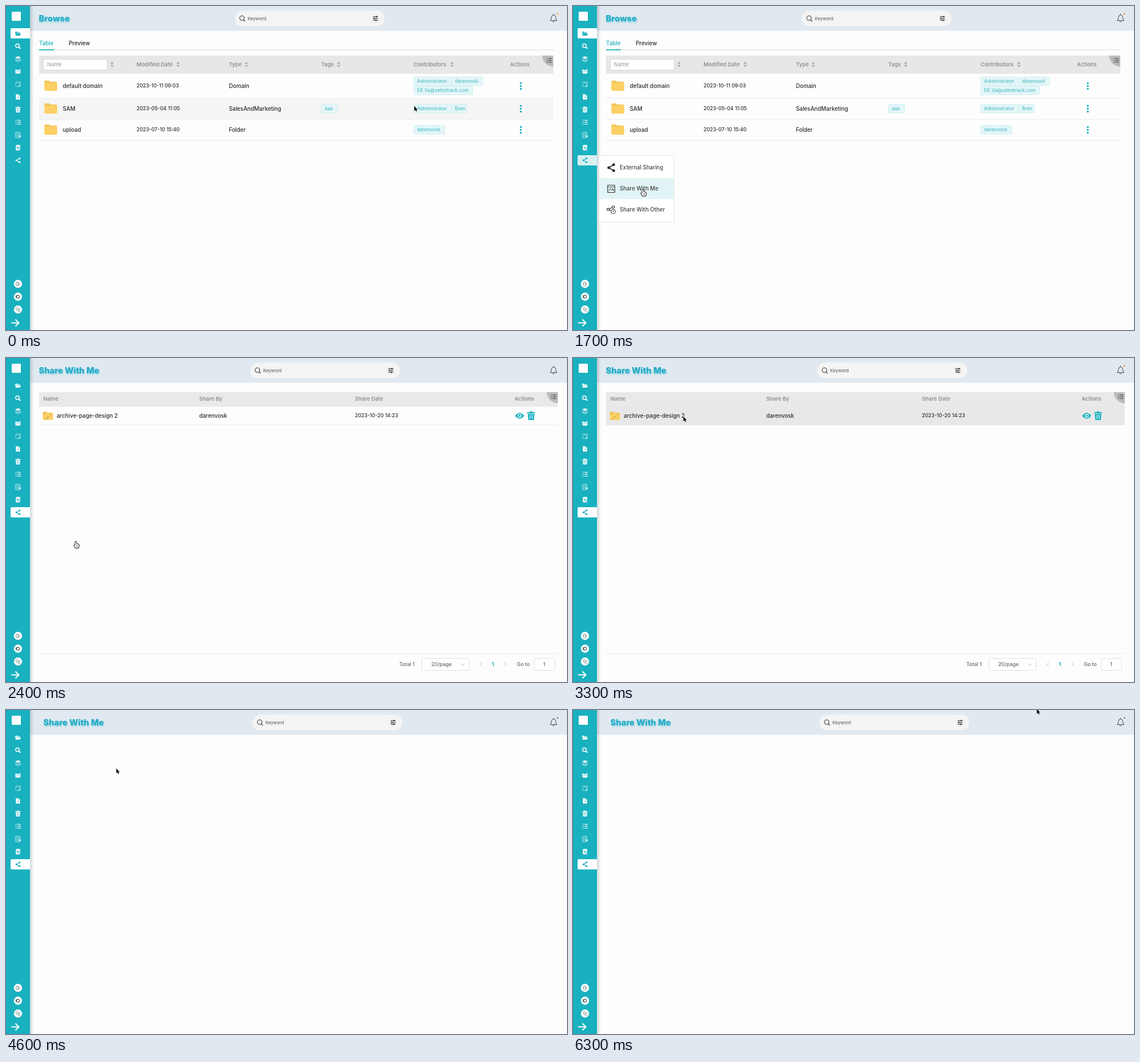
An HTML page with a canvas for the animation above (6.4 s loop, 984 by 569 pixels).

```html
<!DOCTYPE html>
<html lang="en">
<head>
<meta charset="utf-8">
<title>Shared documents</title>
<style>
html, body { margin: 0; width: 984px; height: 569px; overflow: hidden; background: #fdfdfd; }
canvas { display: block; }
</style>
</head>
<body>
<canvas id="stage" width="984" height="569"></canvas>
<script>
const ctx = document.getElementById('stage').getContext('2d');
const LOOP = 6400, STEP = 100;
const TEAL = '#19b1bf', INK = '#2b2b2b', GREY = '#8e8e90', LINE = '#e9e9ed';
const OPEN_MENU = 800, SHARED_PAGE = 2300, EMPTY_PAGE = 4400;
const USER = 'darenvosk';

// Pointer stops: time, x, y
const STOPS = [
  [0, 716, 175.5], [100, 716, 175.5], [800, 13.5, 271.5], [1000, 13.5, 271.5],
  [1500, 122.5, 322.5], [2600, 122.5, 322.5], [3200, 193.5, 102.5],
  [5500, 193.5, 102.5], [6300, 813.5, -2]
];

function pointerAt(t) {
  const i = STOPS.findIndex(s => s[0] > t);
  if (i < 0) return STOPS[STOPS.length - 1].slice(1);
  const [t0, x0, y0] = STOPS[i - 1], [t1, x1, y1] = STOPS[i];
  const k = (t - t0) / (t1 - t0), e = k * k * (3 - 2 * k);
  return [x0 + (x1 - x0) * e, y0 + (y1 - y0) * e];
}

function rect(x, y, w, h, fill, r = 0, border) {
  ctx.beginPath();
  ctx.roundRect(x, y, w, h, r);
  if (fill) { ctx.fillStyle = fill; ctx.fill(); }
  if (border) { ctx.strokeStyle = border; ctx.lineWidth = 1; ctx.stroke(); }
}

function text(s, x, y, size = 9.8, color = INK, weight = 500) {
  ctx.font = `${weight} ${size}px Inter, sans-serif`;
  ctx.fillStyle = color;
  ctx.fillText(s, x, y + size * 0.36);
}
const date = (s, x, y) => text(s, x, y, 8.8);
const heading = (s, x, y) => text(s, x, y, 9.4, GREY, 600);

function circle(x, y, r, fill, stroke, width = 1) {
  ctx.beginPath();
  ctx.arc(x, y, r, 0, 7);
  if (fill) { ctx.fillStyle = fill; ctx.fill(); }
  if (stroke) { ctx.strokeStyle = stroke; ctx.lineWidth = width; ctx.stroke(); }
}

function poly(points, color, width) {
  ctx.beginPath();
  points.forEach(([x, y]) => ctx.lineTo(x, y));
  if (width) { ctx.strokeStyle = color; ctx.lineWidth = width; ctx.stroke(); }
  else { ctx.fillStyle = color; ctx.closePath(); ctx.fill(); }
}

function path(d, color, width) {
  const p = new Path2D(d);
  if (width) { ctx.strokeStyle = color; ctx.lineWidth = width; ctx.stroke(p); }
  else { ctx.fillStyle = color; ctx.fill(p); }
}

function at(x, y, draw, scale = 1) {
  ctx.save();
  ctx.translate(x, y);
  ctx.scale(scale, scale);
  draw();
  ctx.restore();
}

const icon = {
  folder(c) {
    path('M-5 3V-3.5H-1.5L-.5-2.5H3.5V-1H-3Z', c);
    path('M-3-.4H5.6L3.6 4H-5Z', c);
  },
  search(c) {
    circle(-1, -1, 3.4, null, c, 1.6);
    poly([[1.5, 1.5], [4.8, 4.8]], c, 2);
  },
  layers(c) {
    path('M0-5L5.5-2.4L0 .2L-5.5-2.4Z', c);
    path('M-5.5 0L0 2.6L5.5 0V1L0 3.4L-5.5 1Z', c);
    path('M-5.5 2.5L0 5L5.5 2.5V3.3L0 5.7L-5.5 3.3Z', c);
  },
  addFolder(c) {
    icon.folder(c);
    poly([[3.5, -5], [3.5, -1]], c, 1);
    poly([[1.5, -3], [5.5, -3]], c, 1);
  },
  box(c) {
    ctx.globalAlpha = 0.6;
    rect(-4.5, -2.5, 8, 7, null, 1, c);
    poly([[-3.5, -4.5], [4.5, -4.5], [4.5, 0]], c, 1);
    circle(3, 3, 1.8, c);
  },
  file(c) {
    path('M-4-5H1.5L4-2.5V5H-4Z', c);
    path('M1.5-5V-2.5H4M-1 1H2M.5-.5V2.5', TEAL, 0.8);
  },
  trash(c, gap = TEAL) {
    rect(-5, -4.6, 10, 1.5, c);
    rect(-1.7, -5.6, 3.4, 1.5, c);
    path('M-4.2-2.4H4.2L3.5 5.5H-3.5Z', c);
    [-1.7, 0, 1.7].forEach(x => rect(x - 0.3, -1, 0.6, 5, gap));
  },
  list(c) {
    [-3.6, 0, 3.6].forEach(y => {
      poly([[-5, y], [-4.1, y + 0.9], [-2.6, y - 1.1]], c, 1);
      rect(-1.2, y - 0.6, 6.5, 1.3, c);
    });
  },
  form(c) {
    ctx.globalAlpha = 0.8;
    rect(-4.5, -5, 8, 10, null, 0.5, c);
    [-2.5, 0, 2.5].forEach(y => rect(-3, y - 0.4, 5, 0.8, c));
    circle(3.5, 2.5, 2, c);
  },
  copy(c) {
    rect(-4, -5, 8, 10, c, 1);
    circle(0.5, 0.5, 2.2, null, TEAL, 0.9);
    poly([[-3, -3], [3, 4]], TEAL, 0.8);
  },
  share(c) {
    poly([[3, -3.6], [-3, 0], [3, 3.6]], c, 1.3);
    [[3, -3.6], [-3, 0], [3, 3.6]].forEach(([x, y]) => circle(x, y, 1.7, c));
  },
  image(c) {
    rect(-6, -5.5, 12, 12, null, 0.5, c);
    poly([[-6, -2.7], [6, -2.7]], c, 0.8);
    poly([[-4.5, 4.5], [-1.5, -0.5], [1, 3], [3, 0], [4.8, 4.5]], c, 0.9);
  },
  shareClock(c) {
    poly([[3, -4], [-4, 0], [1, 3]], c, 1);
    circle(3.5, -4, 2, '#fff', c);
    circle(-5, 0, 2, '#fff', c);
    circle(3.5, 3.5, 3.5, '#fff', c);
    poly([[3.5, 1.5], [3.5, 3.7], [5, 4]], c, 0.8);
  },
  eye(c) {
    path('M-8 0Q0-10 8 0Q0 10-8 0Z', c);
    circle(0, 0, 3.3, '#fff');
    circle(0, 0, 2, c);
  }
};
const SIDE = ['folder', 'search', 'layers', 'addFolder', 'box', 'file', 'trash', 'list', 'form', 'copy', 'share'];

function sidebar(active, hovered) {
  const shade = ctx.createLinearGradient(42, 0, 49, 0);
  shade.addColorStop(0, 'rgba(60,90,100,.24)');
  shade.addColorStop(1, 'rgba(60,90,100,0)');
  rect(42, 0, 7, 569, shade);
  rect(0, 0, 42, 569, TEAL);
  rect(10, 10, 16, 16, '#fff');
  SIDE.forEach((name, i) => {
    const y = 48.3 + i * 22.27, on = i === active, over = i === hovered;
    if (on || over) rect(8, Math.round(y) - 9, 34, 18, on ? '#fff' : '#d7eff2', [2, 0, 0, 2]);
    at(21, y, () => icon[name](on || over ? TEAL : '#fff'), 0.93);
  });
  [488, 510.5, 533].forEach(y => circle(21, y, 7.2, '#f8fcfc'));
  rect(18, 485, 4.5, 6, null, 1, '#7c8586');
  poly([[20.5, 488], [24.5, 488]], '#7c8586', 1);
  circle(21, 510.5, 2.6, null, '#596b6d', 1.4);
  poly([[17.5, 508], [17.5, 513]], '#596b6d', 1);
  circle(19.6, 531.7, 2.2, null, '#899');
  circle(22.8, 534.5, 2.2, null, '#899');
  poly([[9, 556.5], [22, 556.5]], '#fff', 2);
  poly([[16.5, 550.5], [22.5, 556.5], [16.5, 562.5]], '#fff', 2);
}

function topBar(title, titleX, shift, dot) {
  rect(41, 0, 943, 43.5, '#e1e9f0');
  ctx.save();
  ctx.shadowColor = 'rgba(25,177,205,.5)';
  ctx.shadowBlur = 3;
  ctx.shadowOffsetX = 1;
  ctx.shadowOffsetY = 2;
  text(title, titleX, 21.5, 14.7, '#22abc6', 800);
  ctx.restore();
  at(shift, 0, () => {
    rect(401.5, 8, 262.5, 28, '#f4f4f4', 14);
    circle(414, 21.3, 4, null, '#333', 1.1);
    poly([[416.8, 24.2], [419.5, 27]], '#333', 1.2);
    text('Keyword', 424, 21.8, 7.9, '#555', 400);
    [[18.6, 2], [21.8, -2], [25, 1]].forEach(([y, k]) => {
      rect(643.5, y - 0.5, 9, 1.1, '#333');
      rect(647 + k, y - 1.4, 1.6, 2.8, '#333');
    });
  });
  path('M954.5 25.5Q956.7 23.5 956.7 20Q957 16 960.5 15.7Q964 16 964.3 20Q964.3 23.5 966.5 25.5Z', '#3c4650', 1);
  path('M958.7 26.5Q960.5 30 962.3 26.5M960.5 14V16', '#3c4650', 1);
  if (dot) circle(967.3, 14, 1.6, dot);
}

function corner(x, y, iconX, iconY) {
  ctx.beginPath();
  ctx.moveTo(x, y);
  ctx.lineTo(x, y + 19);
  ctx.arc(x, y, 19.5, Math.PI / 2, Math.PI);
  ctx.fillStyle = '#bcbcbc';
  ctx.fill();
  at(iconX, iconY, () => icon.list('#444'), 0.9);
}

function sorter(x) {
  poly([[x - 3, 101.5], [x, 98], [x + 3, 101.5]], '#a5a5a8');
  poly([[x - 3, 103.7], [x, 107.2], [x + 3, 103.7]], '#a5a5a8');
}

function yellowFolder(x, y, scale = 1) {
  at(x, y, () => {
    path('M-11-7.5Q-11-9-9.5-9H-3L-1-7H9Q11-7 11-5V7H-11Z', '#f3c65a');
    rect(-11, -5, 22, 14, '#fcd064', 1.5);
  }, scale);
}

function tag(s, x, y, w) {
  rect(x + 0.5, y - 7.5, w - 1, 15, '#e4f6f8', 2, '#cdeef1');
  text(s, x + 6, y, 8.3, '#3bb4c2', 400);
}

function browsePage(px, py) {
  text('Table', 58, 65, 9.8, TEAL);
  text('Preview', 110, 65);
  rect(58, 76.5, 902, 1, '#dcdce0');
  rect(58, 76, 26, 1.7, TEAL);
  rect(58, 87, 902, 32, '#e7e7e8');
  rect(65.5, 93.5, 112, 19, '#fff', 2, '#d8d8dc');
  text('Name', 72, 103, 9.3, '#999', 400);
  sorter(186);
  [['Modified Date', 229, 302], ['Type', 391, 421.5], ['Tags', 553, 583.5], ['Contributors', 715, 782]]
    .forEach(([s, x, sx]) => { heading(s, x, 102.5); sorter(sx); });
  heading('Actions', 884, 102.5);
  corner(960, 87, 952.5, 95.5);

  const rows = [
    [119, 162, 140, 'default domain', '2023-10-11 09:03', 'Domain'],
    [162, 199, 180, 'SAM', '2023-05-04 11:05', 'SalesAndMarketing'],
    [199, 236, 217, 'upload', '2023-07-10 15:40', 'Folder']
  ];
  rows.forEach(([top, end, y, name, modified, type]) => {
    if (px > 58 && px < 960 && py >= top && py < end) rect(58, top, 902, end - top, '#f5f5f5');
    rect(58, end - 0.5, 902, 1, LINE);
    yellowFolder(78.5, y);
    text(name, 99.5, y);
    date(modified, 229, y);
    text(type, 391, y);
    [-5, 0, 5].forEach(d => circle(903, y + 0.5 + d, 1.7, TEAL));
  });
  tag('Administrator', 715, 132.3, 66.5);
  tag(USER, 781.5, 132.3, 55);
  tag('EK.Va@zelmitrack.com', 715, 148.3, 104);
  tag('aaa', 553, 180.3, 29);
  tag('Administrator', 715, 180.3, 66.5);
  tag('Bren', 781.5, 180.3, 28);
  tag(USER, 715, 217.5, 55);
}

function shareMenu(px, py) {
  rect(45.5, 262.5, 132, 117, '#fff', 2, '#e6e6e8');
  [['External Sharing', 'share'], ['Share With Me', 'image'], ['Share With Other', 'shareClock']].forEach(([s, name], i) => {
    const y = 284 + i * 36.6;
    if (px > 46 && px < 178 && Math.abs(py - y) < 18.3) rect(46, y - 18.3, 131, 36.6, '#e2f4f6');
    at(67, y, () => icon[name](INK), name === 'share' ? 1.45 : 1.05);
    text(s, 82, y, 9.7, '#444');
  });
}

function sharedPage(px, py) {
  const over = px > 58 && px < 968 && py > 85 && py < 118;
  rect(58, 60, 910, 25.5, '#e9e9ea');
  if (over) rect(58, 85, 910, 33, '#e8e8e9');
  rect(58, 117.3, 910, 1, LINE);
  [['Name', 65.5], ['Share By', 339], ['Share Date', 612], ['Actions', 892]].forEach(([s, x]) => heading(s, x, 72));
  corner(968, 60, 960.5, 68);
  yellowFolder(73.5, 101.5, 0.8);
  for (let i = 0; i < 10; i++) circle(66.5 + i * 5.3 % 14, 97 + i * 7.1 % 11, 0.6, '#9b7a2f');
  text('archive-page-design 2', 89, 101);
  text(USER, 339, 101);
  date('2023-10-20 14:23', 612, 101);
  at(901, 101.5, () => icon.eye(TEAL));
  at(921, 101.5, () => icon.trash(TEAL, '#fff'), 1.38);

  rect(58, 518.5, 910, 1, LINE);
  text('Total 1', 690, 538, 8.9, '#666');
  rect(729.5, 527.5, 83, 21, '#fff', 2, '#e0e0e4');
  text('20/page', 746, 538, 8.9, '#666');
  poly([[797.5, 536.5], [801, 540], [804.5, 536.5]], '#bbb', 1);
  poly([[834.5, 534.5], [831.5, 538], [834.5, 541.5]], '#bbb', 1);
  text('1', 852, 538, 9.3, TEAL, 700);
  poly([[874.5, 534.5], [877.5, 538], [874.5, 541.5]], '#bbb', 1);
  text('Go to', 896, 538, 8.9, '#666');
  rect(926.5, 527.5, 36, 21, '#fff', 2, '#e0e0e4');
  text('1', 942, 538, 8.9, '#666');
}

function outlined(d, fill, stroke, width) {
  const p = new Path2D(d);
  ctx.lineJoin = 'round';
  ctx.lineWidth = width;
  ctx.strokeStyle = stroke;
  ctx.stroke(p);
  ctx.fillStyle = fill;
  ctx.fill(p);
}
const arrow = () => outlined('M0 0V8.8L2 7L3.4 10L4.9 9.3L3.6 6.4H6Z', '#111', '#fff', 1);
const hand = () => {
  outlined('M-1 .5Q0-.7 1 .5V4L5 5Q6 5.5 5.5 8L4.5 11H-.5L-3 7Q-3.2 5.4-1 6.6Z', '#fff', '#111', 1.9);
  path('M1.2 6.5V9.5M3.2 6.5V9.5', '#222', 0.7);
};

function render(t) {
  const [px, py] = pointerAt(t);
  const shared = t >= SHARED_PAGE, empty = t >= EMPTY_PAGE, moving = t > 2600;
  rect(0, 0, 984, 569, '#fdfdfd');
  const dot = empty ? '#8d8790' : shared && !moving ? null : '#eda33c';
  topBar(shared ? 'Share With Me' : 'Browse', empty ? 65.5 : 57.5, empty ? 31 : shared ? 27 : 0, dot);
  if (!shared) browsePage(px, py);
  else if (!empty) sharedPage(px, py);
  const menu = t >= OPEN_MENU && !shared;
  sidebar(shared ? 10 : 0, menu ? 10 : -1);
  if (menu) shareMenu(px, py);
  at(px, py, t >= OPEN_MENU && !moving ? hand : arrow);
}

const start = performance.now();
function tick() {
  const t = (performance.now() - start) % LOOP;
  render(Math.floor(t / STEP) * STEP);
  requestAnimationFrame(tick);
}
tick();
</script>
</body>
</html>
```
